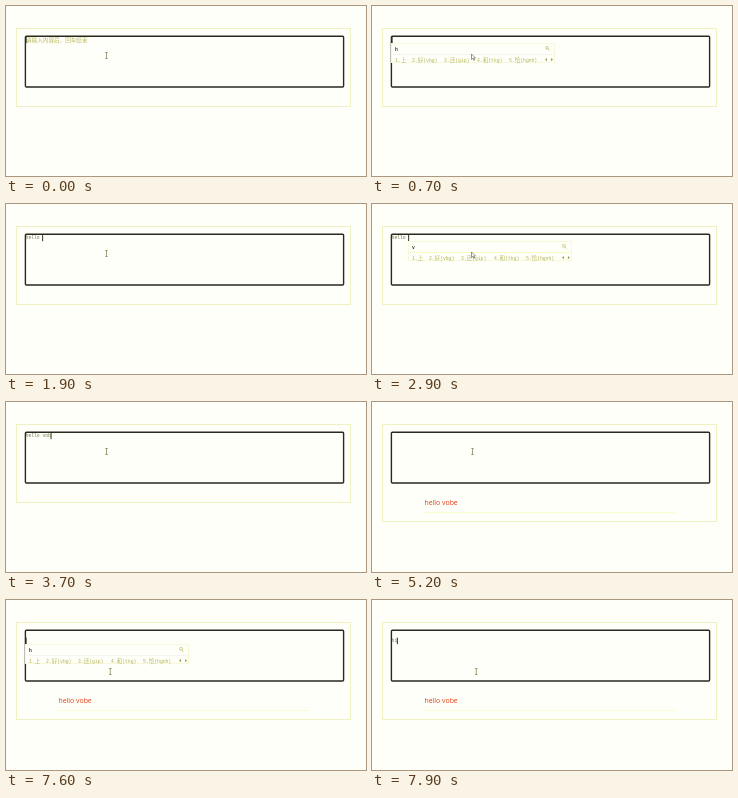
An HTML page that plays this animation: 360x170 px, repeating every 8000 ms.

```html
<!DOCTYPE html>
<html lang="zh">
<head>
<meta charset="utf-8">
<title>Text input</title>
<style>
html, body { margin: 0; width: 100%; height: 100%; overflow: hidden; background: #fffffa; }
svg { display: block; width: 360px; height: 170px; }
text { white-space: pre; }
.mono { font: 4.7px "Liberation Mono", "Noto Sans CJK SC", monospace; fill: #77774a; }
.cjk { font: 5.6px "Noto Sans CJK SC", "Noto Sans CJK", sans-serif; fill: #b9b95c; }
.note { font: 6.9px "Open Sans", sans-serif; fill: #e43c16; }
.dots { fill: none; stroke: #e3e38a; stroke-dasharray: 1 1; }
.line { fill: none; stroke: #77774a; stroke-width: .7; }
</style>
</head>
<body>
<svg viewBox="0 0 360 170">
  <rect id="frame" class="dots" x="10.5" y="22.5" width="334" height="78"/>
  <rect x="19.4" y="30.3" width="318.2" height="50.7" rx="1" fill="none" stroke="#29291f" stroke-width="1.4"/>
  <text id="hint" class="cjk" x="20" y="36">请输入内容后，回车结束</text>
  <text id="typed" class="mono" x="19.6"></text>
  <g id="note">
    <text class="note" x="52.5" y="103">hello vobe</text>
    <path class="dots" d="M52 110.5H304" style="stroke:#f6f6cc"/>
  </g>
  <rect id="caret" width="1" height="6.6" fill="#33331f"/>
  <g id="ime">
    <rect width="164" height="20" fill="#fffffa"/>
    <path class="dots" d="M.5 .5H163.5V19.5H.5ZM0 11.5H164" style="stroke:#f1f1b8"/>
    <text id="keys" class="mono" x="4" y="7.8" style="font-weight:bold;fill:#33331f"></text>
    <circle class="line" cx="156" cy="4.8" r="1.4" style="stroke:#b9b95c"/>
    <path class="line" d="M157 6l1.6 1.6" style="stroke:#b9b95c"/>
    <g id="choices"></g>
    <path d="M156 15l-2 1.6 2 1.6zM160 15l2 1.6-2 1.6z" fill="#a0a050"/>
  </g>
  <path id="beam" class="line" d="M-1.2-3H1.2M0-3V3M-1.2 3H1.2"/>
  <path id="arrow" d="M-1-2.5V3L.4 1.8 1.3 3.8 2.2 3.4 1.3 1.5H3Z" fill="#fffffa" stroke="#55553a" stroke-width=".6"/>
</svg>
<script>
const LOOP = 8000, LEFT = 19.6, ADVANCE = 2.82;
const el = id => document.getElementById(id);
const show = (id, on) => el(id).style.display = on ? '' : 'none';
const place = (id, x, y) => el(id).setAttribute('transform', `translate(${x} ${y})`);

// time, committed text, caret shown, line, keys in the input method
const typing = [
  [0, '', 1, 0], [100, '', 0, 0], [400, '', 1, 0],
  [700, '', 1, 0, 'h'], [1100, '', 0, 0, 'h'], [1300, '', 1, 0, 'h'],
  [1400, 'h', 1, 0], [1500, 'he', 1, 0], [1600, 'hel', 1, 0],
  [1800, 'hello', 1, 0], [1900, 'hello ', 1, 0], [2600, 'hello ', 0, 0],
  [2800, 'hello ', 1, 0], [2900, 'hello ', 1, 0, 'v'],
  [3200, 'hello ', 1, 0], [3300, 'hello v', 1, 0], [3700, 'hello vob', 1, 0],
  [3900, 'hello vob', 0, 0], [4000, 'hello vobe', 1, 0],
  [4400, '', 1, 1], [4800, '', 0, 1], [5100, '', 1, 1], [5200, '', 0, 1],
  [5500, '', 1, 1], [5900, '', 0, 1], [6100, '', 1, 1],
  [6800, 'h', 1, 1], [6900, 'hi', 1, 1], [7200, 'hi', 0, 1],
  [7300, 'h', 1, 1], [7400, '', 1, 1],
  [7600, '', 1, 1, 'h'], [7800, 'h', 1, 1], [7900, 'hi', 1, 1]
];
const pointer = [[0, 100.5, 49.5], [5900, 102, 60], [6000, 104.5, 76], [6100, 104.3, 71.5]];
const at = (steps, t) => steps.filter(step => step[0] <= t).pop();

const choices = ['1.上', '2.好(vbg)', '3.还(gip)', '4.和(tkg)', '5.恰(hgnh)'];
el('choices').innerHTML = choices.map((word, i) =>
  `<text class="cjk" x="${[4, 21, 53, 86, 118][i]}" y="18.5">` +
  word.replace(/[\x00-\x7f]+/g, s => `<tspan class="mono" style="fill:#b0b052">${s}</tspan>`) +
  '</text>').join('');

function draw(t) {
  const [, text, caret, line, keys] = at(typing, t);
  const [, px, py] = at(pointer, t);
  const sent = t >= 4400;
  const x = LEFT + ADVANCE * text.length;

  el('typed').textContent = text;
  el('typed').setAttribute('y', 35.4 + line * 7);
  place('caret', x - (text ? .4 : 0), 30.6 + line * 7);
  show('caret', caret);
  show('hint', !sent && !text && !keys);

  show('ime', keys);
  el('keys').textContent = keys || '';
  place('ime', x - .6, 37 + line * 7);

  el('frame').setAttribute('height', sent ? 97 : 78);
  el('note').style.opacity = sent ? Math.min(1, (Math.floor(t / 100) - 43) / 5) : 0;

  const overPanel = keys && !sent;
  show('beam', !overPanel);
  show('arrow', overPanel);
  place('beam', px, py);
  place('arrow', px, py + 1);
}

const start = performance.now();
(function tick() {
  draw((performance.now() - start) % LOOP);
  requestAnimationFrame(tick);
})();
</script>
</body>
</html>
```
